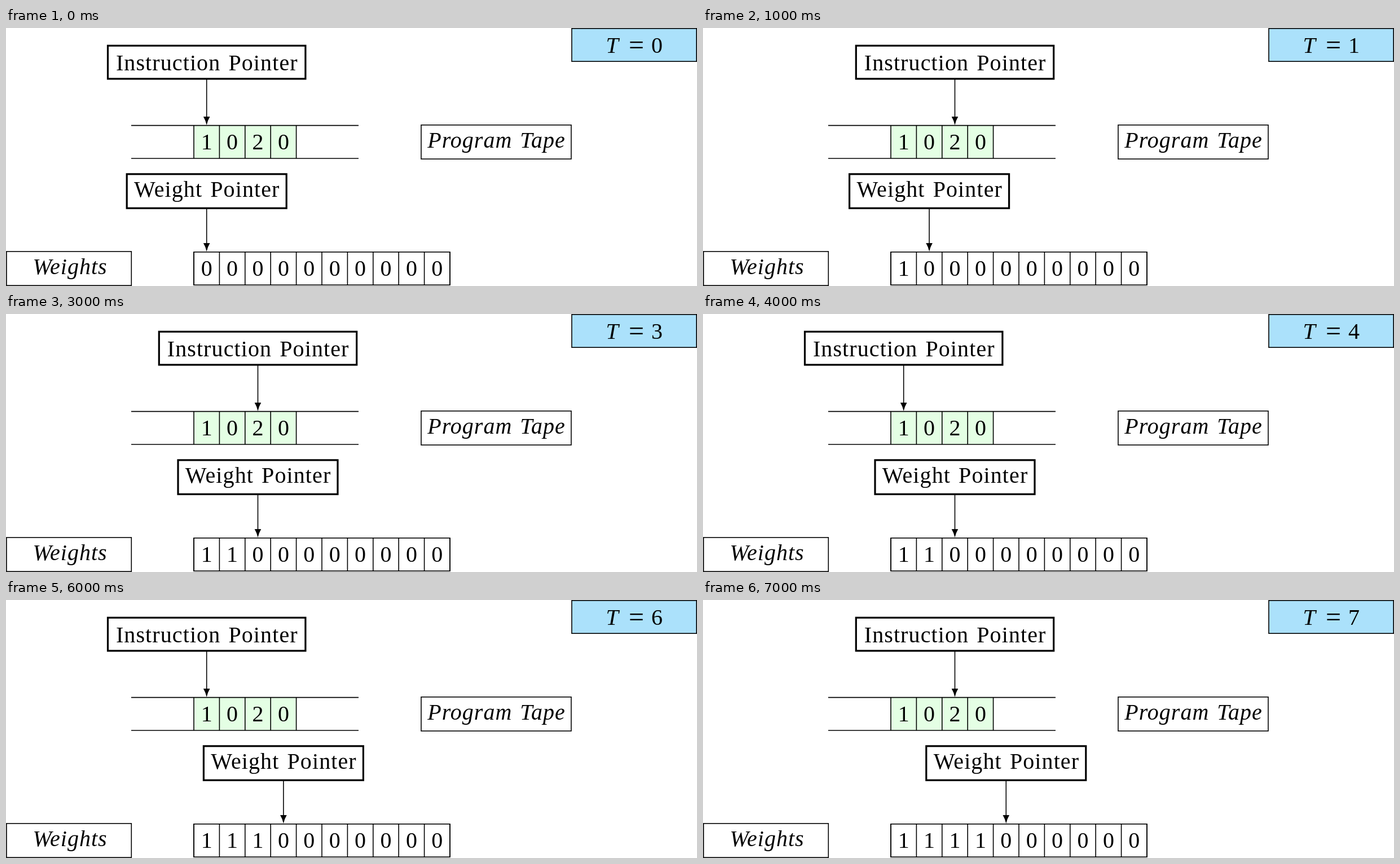
Animation of 1225 by 457 pixels, one loop 8 s. Source, as an HTML page:

```html
<!DOCTYPE html>
<html lang="en">
<head>
<meta charset="utf-8">
<title>Program tape and weights</title>
<style>
  html, body { margin: 0; width: 100%; height: 100%; overflow: hidden; background: #fff; }
  svg { display: block; }
  text { font: 40px "Liberation Serif", serif; text-anchor: middle; }
  .label { letter-spacing: 1.1px; word-spacing: 3px; }
  .math { font-style: italic; letter-spacing: 1px; word-spacing: 3px; }
  .equals { font-size: 48px; }
  .line { fill: none; stroke: #000; stroke-width: 1.6; }
  .thick { fill: none; stroke: #000; stroke-width: 3.2; }
</style>
</head>
<body>
<svg id="stage" width="1225" height="457" viewBox="0 0 1225 457"></svg>
<script>
const STEP = 1000, STEPS = 8, CELL = 45.4, LEFT = 333, HEIGHT = 58.4;
const stage = document.getElementById("stage");

function add(parent, tag, attrs, content = "") {
  const node = document.createElementNS("http://www.w3.org/2000/svg", tag);
  for (const key in attrs) node.setAttribute(key, attrs[key]);
  node.textContent = content;
  return parent.appendChild(node);
}
const text = (x, y, content, cls = "", parent = stage) =>
  add(parent, "text", { x, y, class: cls }, content);
const path = (d, cls = "line", parent = stage) => add(parent, "path", { d, class: cls });
const box = (x, y, width, height, fill = "none", cls = "line", parent = stage) =>
  add(parent, "rect", { x, y, width, height, class: cls, style: `fill:${fill}` });

// A row of digit cells; returns the digit text nodes.
function cells(digits, top) {
  for (let i = 0; i <= digits.length; i++) path(`M${LEFT + i * CELL} ${top}v${HEIGHT}`);
  return digits.map((d, i) => text(LEFT + (i + 0.5) * CELL, top + 42.2, d));
}

// A labelled box with an arrow, centred over the first cell.
function pointer(label, width, top, bottom, baseline, tip) {
  const g = add(stage, "g", {}), x = LEFT + CELL / 2;
  box(x - width / 2, top, width, bottom - top, "#fff", "thick", g);
  text(x + 0.6, baseline, label, "label", g);
  path(`M${x} ${bottom}V${tip - 12}`, "line", g);
  path(`M${x} ${tip}q-1.6 -8 -5.8 -15h11.6q-4.2 7 -5.8 15z`, "", g);
  return cell => g.setAttribute("transform", `translate(${cell * CELL})`);
}

box(1003, 0.9, 221.2, 58.3, "#abe1fb");
text(1075, 44, "T", "math");
text(1117.5, 46, "=", "equals");
const clock = text(1154, 44, 0);

box(LEFT, 172.6, 4 * CELL, HEIGHT, "#e4ffe4", "");
path(`M222 172.6H625m-403 ${HEIGHT}H625`);
cells([1, 0, 2, 0], 172.6);
box(736, 171.8, 266, 60.2);
text(869.5, 212, "Program Tape", "math");

box(0.9, 395.9, 221.4, 60.2);
text(113.5, 436, "Weights", "math");
box(LEFT, 396.8, 10 * CELL, HEIGHT);
const weights = cells(Array(10).fill(0), 396.8);

const moveInstruction = pointer("Instruction Pointer", 350.4, 31.3, 90, 75, 172);
const moveWeight = pointer("Weight Pointer", 283, 258.8, 319.2, 299, 396);

// Even steps write a 1 and advance; odd steps jump back to the tape start.
function show(t) {
  const written = Math.ceil(t / 2);
  clock.textContent = t;
  moveInstruction(t % 2 * 2);
  moveWeight(written);
  weights.forEach((node, i) => node.textContent = i < written ? 1 : 0);
}

let start, shown;
function frame(now) {
  start ??= now;
  const t = Math.floor((now - start) / STEP) % STEPS;
  if (t !== shown) show(shown = t);
  requestAnimationFrame(frame);
}
show(0);
requestAnimationFrame(frame);
</script>
</body>
</html>
```
